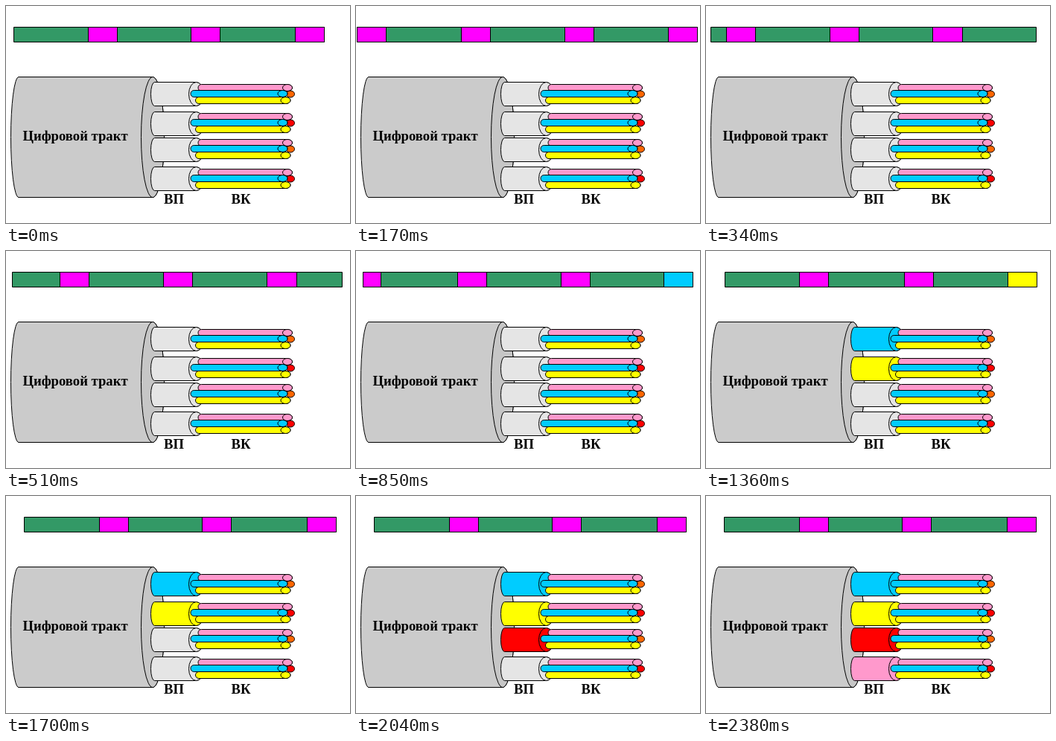
Write an HTML page with a canvas that moves like this. It is 462 px wide and 292 px high and loops after 2550 ms.

```html
<!DOCTYPE html>
<html lang="ru">
<head>
<meta charset="utf-8">
<style>
html, body { margin: 0; width: 100%; height: 100%; overflow: hidden; background: #fff; }
canvas { display: block; }
</style>
</head>
<body>
<canvas id="stage" width="462" height="292"></canvas>
<script>
const ctx = document.getElementById('stage').getContext('2d');
const LOOP = 2550, STEP = 170, SLOT = 39;
const GREEN = '#339966', MAGENTA = '#ff00ff', BLUE = '#00ccff', YELLOW = '#ffff00';
const RED = '#ff0000', PINK = '#ff99cc', ORANGE = '#ff6600', PALE = '#e5e5e5';

// Bar layouts: first step, left edge, right edge, slot positions
const BARS = [
  { from: 0, left: 10, right: 427, slots: [110, 248, 388] },
  { from: 1, left: 1, right: 458, slots: [1, 141, 280, 419] },
  { from: 2, left: 6, right: 443, slots: [27, 166, 304] },
  { from: 3, left: 8, right: 451, slots: [72, 211, 350] },
  { from: 4, left: 8, right: 451, slots: [104, 243, 382] },
  { from: 5, left: 9, right: 452, slots: [-6, 136, 275, 413] },
  { from: 7, left: 25, right: 444, slots: [125, 266, 405] },
  { from: 10, left: 24, right: 443, slots: [125, 263, 404] }
];

// The last slot flashes in its pipe's colour; the pipe then stays filled
const PIPES = [
  { y: 102.5, wires: 102, color: BLUE, lit: 6, flash: [5, 7], tip: ORANGE },
  { y: 142.5, wires: 141, color: YELLOW, lit: 8, flash: [8, 10], tip: RED },
  { y: 177.5, wires: 176, color: RED, lit: 11, flash: [11, 12], tip: ORANGE },
  { y: 216.5, wires: 216, color: PINK, lit: 13, flash: [13, 14], tip: RED }
];

function paint(fill) {
  ctx.fillStyle = fill;
  ctx.fill();
  ctx.stroke();
}

function box(x1, x2, fill) {
  ctx.beginPath();
  ctx.rect(x1 + 0.5, 28.5, x2 - x1, 20);
  paint(fill);
}

function oval(x, y, rx, ry, fill) {
  ctx.beginPath();
  ctx.ellipse(x, y, rx, ry, 0, 0, Math.PI * 2);
  paint(fill);
}

// Lying cylinder: rounded left end, full ellipse at the right end
function cylinder(left, end, top, height, leftR, endR, fill, endFill) {
  const ry = height / 2, mid = top + ry;
  ctx.beginPath();
  ctx.ellipse(left + leftR, mid, leftR, ry, 0, Math.PI / 2, Math.PI * 1.5);
  ctx.ellipse(end, mid, endR, ry, 0, -Math.PI / 2, Math.PI / 2);
  ctx.closePath();
  paint(fill);
  oval(end, mid, endR, ry, endFill);
}

function wire(left, end, y, fill) {
  cylinder(left, end, y - 4.5, 9, 4.5, 6.5, fill, fill);
}

function drawBar(step) {
  const bar = BARS.filter(b => b.from <= step).pop();
  const active = PIPES.find(p => step >= p.flash[0] && step < p.flash[1]);
  box(bar.left, bar.right, GREEN);
  bar.slots.forEach((x, i) => {
    const last = i === bar.slots.length - 1;
    const x1 = Math.max(x, bar.left);
    const x2 = last ? bar.right : x + SLOT;
    const fill = last && active ? active.color : MAGENTA;
    box(x1, Math.min(x2, x + SLOT + 1, bar.right), fill);
  });
}

function drawPipe(pipe, step) {
  const fill = step >= pipe.lit ? pipe.color : PALE;
  const y = pipe.wires;
  cylinder(194.5, 255.5, pipe.y, 32, 5, 10, fill, fill);
  wire(258, 378, y + 8, PINK);
  oval(382, y + 16.5, 5.5, 4.5, pipe.tip);
  wire(248, 371.5, y + 16, BLUE);
  wire(254.5, 375.5, y + 25, YELLOW);
}

function label(text, x, y) {
  ctx.fillText(text, x, y);
}

function draw(time) {
  const step = Math.floor((time % LOOP) / STEP);
  ctx.fillStyle = '#fff';
  ctx.fillRect(0, 0, 462, 292);
  ctx.strokeStyle = '#000';
  ctx.lineWidth = 1;
  drawBar(step);
  cylinder(6.5, 197, 95.5, 162, 10.5, 15.5, '#cbcbcb', '#c6c6c6');
  PIPES.forEach(p => drawPipe(p, step));
  ctx.fillStyle = '#000';
  ctx.textAlign = 'center';
  ctx.font = 'bold 18.67px "Liberation Serif", "Times New Roman", serif';
  label('Цифровой тракт', 93, 181);
  label('ВП', 225.5, 266);
  label('ВК', 315.5, 266);
}

const start = performance.now();
function tick() {
  draw(performance.now() - start);
  requestAnimationFrame(tick);
}
tick();
</script>
</body>
</html>
```
